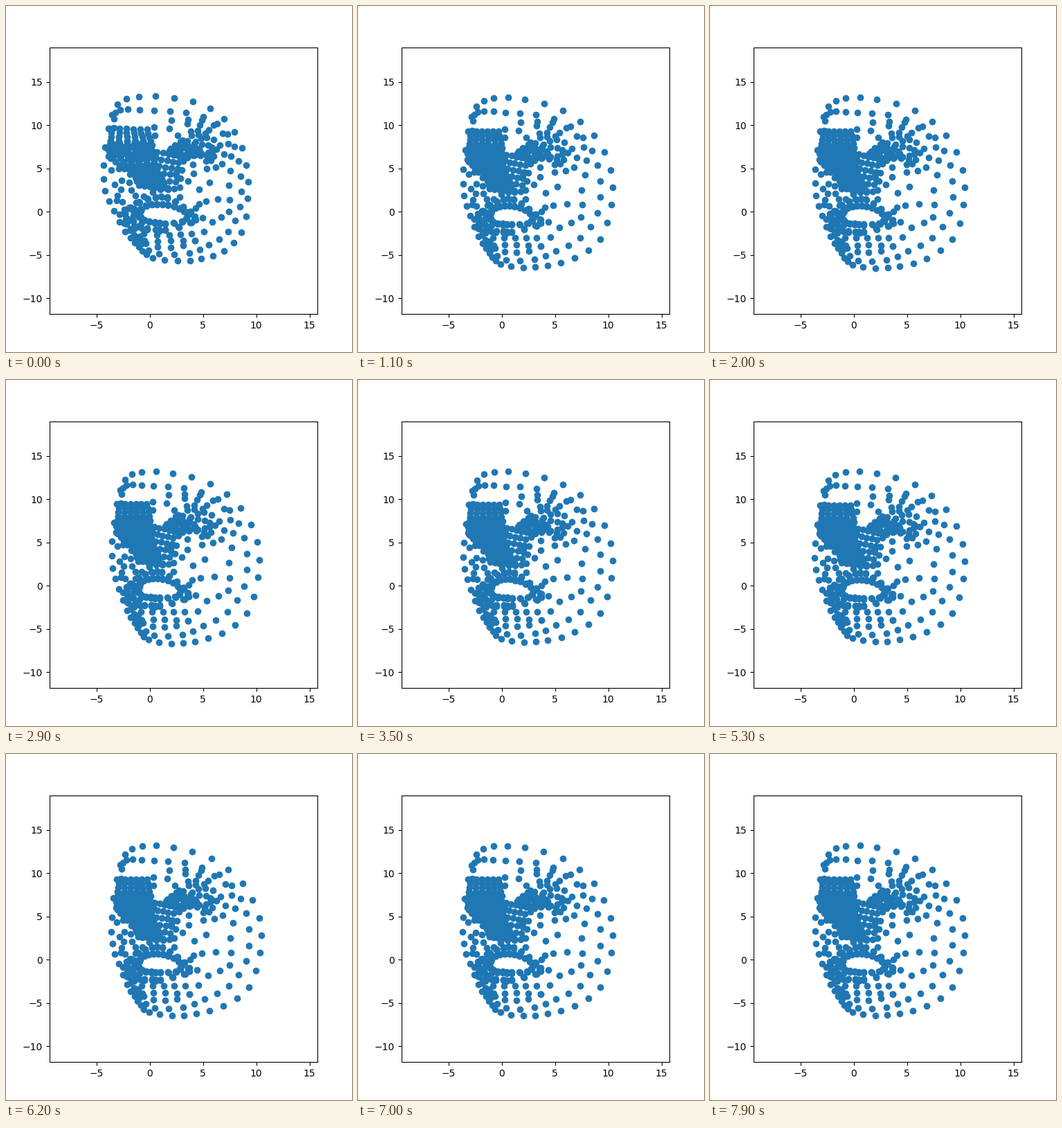
Animation, 500 px wide and 500 px high, one loop 8000 ms. Source, as a matplotlib script:

```python
import numpy as np
import matplotlib.pyplot as plt
from matplotlib.animation import FuncAnimation

FRAMES, STEP = 80, 100
XLIM, YLIM = (-9.45, 15.74), (-11.84, 19.0)
BOX = (62.5, 450.0, 445.0, 60.0)  # axes edges in pixels: left, right, bottom, top


def spline(ctrl, n, closed=False):
    """Sample n points along a Catmull-Rom curve."""
    p = np.array(ctrl, float)
    m = len(p)
    if closed:
        q = np.vstack([p[-1], p, p[:2]])
        s = np.arange(n) * m / n
    else:
        q = np.vstack([2 * p[0] - p[1], p, 2 * p[-1] - p[-2]])
        s = np.linspace(0, m - 1, n)
    i = np.minimum(s.astype(int), m - 1 if closed else m - 2)
    t = (s - i)[:, None]
    a, b, c, d = q[i], q[i + 1], q[i + 2], q[i + 3]
    return 0.5 * (2 * b + (c - a) * t + (2 * a - 5 * b + 4 * c - d) * t**2
                  + (3 * b - a - 3 * c + d) * t**3)


def patch(a, b, c, d, nu, nv):
    """Bilinear grid between four corners, clockwise from top left."""
    u, v = np.meshgrid(np.linspace(0, 1, nu), np.linspace(0, 1, nv))
    u, v = u.reshape(-1, 1), v.reshape(-1, 1)
    a, b, c, d = (np.array(k, float) for k in (a, b, c, d))
    return (1 - v) * ((1 - u) * a + u * b) + v * ((1 - u) * d + u * c)


def ellipse(cx, cy, rx, ry, n):
    t = 2 * np.pi * np.arange(n) / n
    return np.column_stack([cx + rx * np.cos(t), cy + ry * np.sin(t)])


def outline():
    oval = [(241, 135), (296, 151), (341, 187), (365, 237), (366, 287),
            (350, 337), (313, 364), (274, 375), (239, 378), (206, 373),
            (194, 363), (185, 350), (174, 333), (162, 303), (153, 274),
            (152, 236), (159, 181), (171, 145), (196, 133)]
    second = [(182, 152), (213, 154), (257, 157), (307, 174), (338, 209),
              (350, 253), (346, 299), (321, 335), (286, 354), (255, 366),
              (214, 367), (192, 352), (179, 331), (168, 308), (163, 264),
              (158, 222), (165, 180), (168, 157)]
    third = [(235, 168), (281, 168), (316, 188), (330, 223), (323, 266),
             (322, 305), (291, 320), (264, 347), (229, 356), (198, 350),
             (184, 328)]
    return [spline(oval, 38, True), spline(second, 36, True), spline(third, 21)]


def far_side():
    cheek = [(302, 286), (282, 288), (288, 261), (271, 270), (275, 312),
             (270, 291), (265, 297), (254, 258), (244, 253), (242, 266),
             (303, 212), (309, 206), (316, 219), (212, 190)]
    return [
        np.array(cheek, float),
        spline([(212, 178), (232, 180), (258, 173), (277, 175)], 4),
        spline([(243, 190), (262, 184), (273, 183), (291, 183)], 4),
        spline([(249, 197), (263, 190), (273, 189), (285, 188)], 4),
        spline([(238, 205), (250, 198), (268, 200), (282, 193), (298, 197)], 7),
        spline([(249, 228), (257, 222), (270, 220), (284, 222), (297, 222)], 6),
        spline([(246, 241), (263, 233), (284, 229), (292, 228)], 4),
        spline([(238, 245), (263, 247), (284, 240), (300, 238), (312, 233)], 5),
        ellipse(266, 211, 31, 8, 16),
        ellipse(252, 213, 22, 7, 14),
        ellipse(250, 214, 13, 4, 10),
    ]


def near_side():
    return [
        patch((163, 181), (203, 181), (208, 205), (160, 205), 6, 5),
        patch((160, 225), (212, 222), (204, 245), (174, 240), 6, 4),
        ellipse(183, 213, 25, 13, 18),
        ellipse(183, 213, 18, 9, 14),
        ellipse(183, 213, 10, 4, 10),
        spline([(168, 240), (171, 265), (166, 280), (174, 294), (176, 313)], 7),
        spline([(180, 248), (180, 268), (187, 282), (184, 298)], 6),
    ]


def nose():
    return [
        patch((207, 213), (243, 221), (235, 268), (190, 262), 6, 6),
        patch((182, 236), (210, 234), (224, 267), (190, 264), 6, 6),
        spline([(196, 279), (212, 270), (226, 269)], 4),
    ]


def mouth():
    inner = spline([(190, 302), (199, 292), (212, 289), (226, 290), (241, 295),
                    (252, 305), (244, 314), (222, 315), (209, 314),
                    (196, 312)], 20, True)
    outer = spline([(172, 306), (190, 287), (210, 279), (225, 279), (247, 293),
                    (264, 309), (258, 318), (222, 327), (210, 327),
                    (188, 324)], 20, True)
    rings = [inner + k * (outer - inner) for k in (0, 0.12, 0.88, 1)]
    return rings + [
        np.array([(242, 279)], float),
        patch((173, 300), (192, 300), (193, 326), (175, 322), 3, 4),
        spline([(195, 335), (227, 335), (258, 335)], 5),
        spline([(196, 346), (229, 345), (264, 347)], 5),
        spline([(176, 318), (184, 338), (190, 348)], 5),
    ]


FACE = np.vstack(outline() + far_side() + near_side() + nose() + mouth())
U = (FACE[:, 0] - 235) / 130
V = (FACE[:, 1] - 255) / 125
SHAKE = np.random.default_rng(4).normal(0, 0.3, (FRAMES, 2))


def bump(t, mid, width):
    return np.exp(-((t - mid) / width) ** 2)


def pose(i):
    t = i * STEP / 1000
    x, y = FACE.T.copy()

    # head starts turned further to the front, then settles
    s = np.clip(t / 0.8, 0, 1)
    turn = 1 - s * s * (3 - 2 * s)
    lips = np.exp(-((U + 0.1) ** 2 + (V - 0.45) ** 2) / 0.1)
    x += turn * (8 + 7.9 * U - 33 * U**2 + 4 * V - 3 * V**2)
    y += turn * (-5 - V**2 - 4 * V - 3 * U**2 + 6 * lips)

    # short lift, a glance sideways and a slow nod
    y -= 9 * bump(t, 0.5, 0.2) * (1 - V) / 2
    x += 5 * bump(t, 2.3, 0.2) * (0.3 + 0.7 * U)
    nod = bump(t, 2.8, 0.6)
    x -= 2 * nod * U
    y += nod * (-2.5 + 1.5 * V + 4 * V**2)

    if i:
        x += SHAKE[i, 0]
        y += SHAKE[i, 1]
    left, right, bottom, top = BOX
    return np.column_stack([
        XLIM[0] + (x - left) / (right - left) * (XLIM[1] - XLIM[0]),
        YLIM[0] + (y - bottom) / (top - bottom) * (YLIM[1] - YLIM[0])])


fig, ax = plt.subplots(figsize=(5, 5), dpi=100)
dots = ax.scatter(*pose(0).T)
ax.set(xlim=XLIM, ylim=YLIM, xticks=range(-5, 16, 5), yticks=range(-10, 16, 5))


def update(i):
    dots.set_offsets(pose(i))
    return [dots]


anim = FuncAnimation(fig, update, frames=FRAMES, interval=STEP,
                     repeat=True, repeat_delay=0)
plt.show()
```
